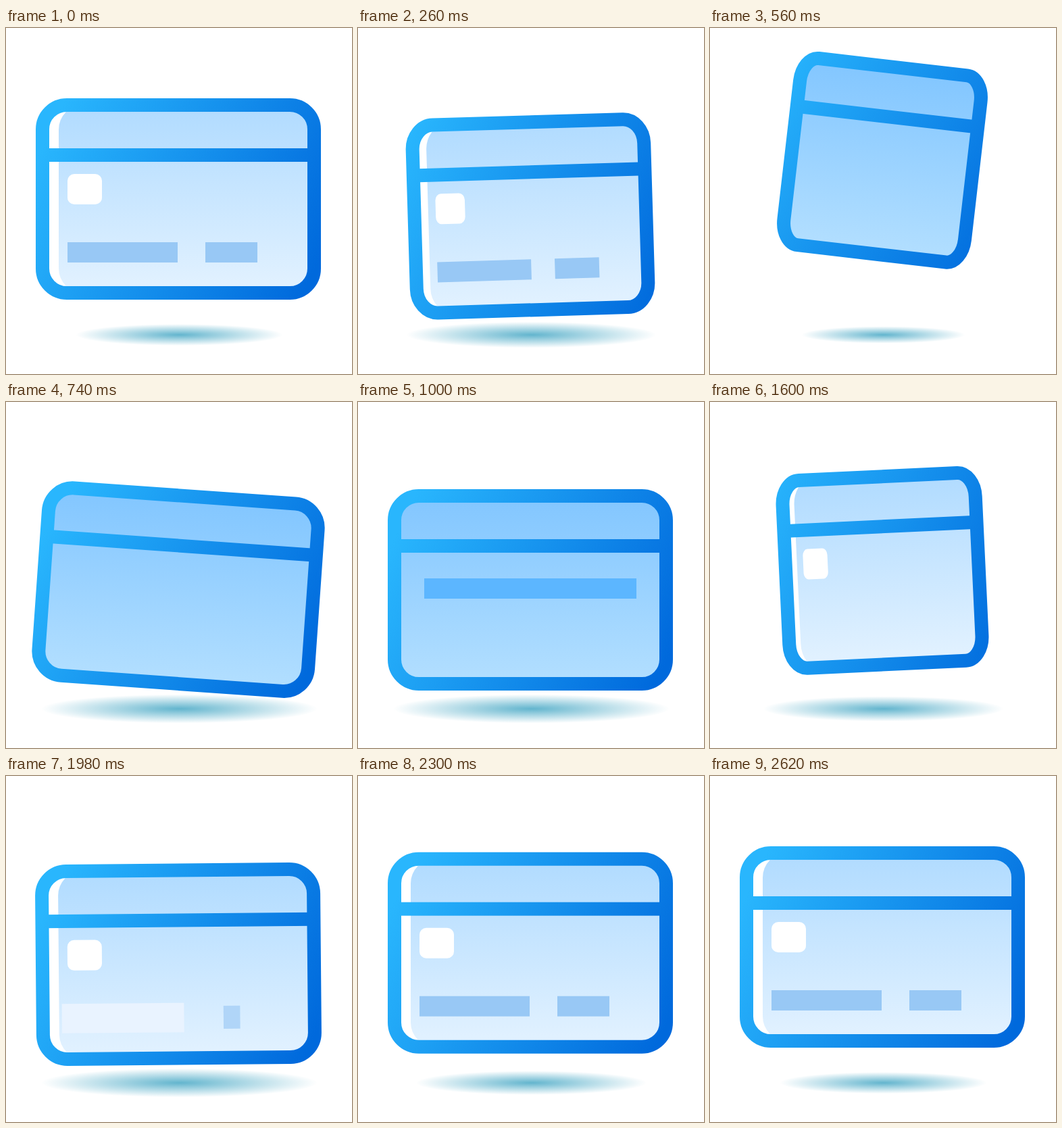
These frames come from a looping animation (512x512 px, 2.64 s). An HTML page:

```html
<!DOCTYPE html>
<html lang="en">
<head>
<meta charset="utf-8">
<title>Flipping card</title>
<style>
  @property --turn { syntax: "<angle>"; inherits: true; initial-value: 0deg; }

  html, body { margin: 0; width: 100%; height: 100%; overflow: hidden; background: #fff; }
  svg { display: block; width: 100vw; height: 100vh; }

  .card, .shadow, .front, .back, .bar {
    animation: 2640ms linear infinite;
  }
  .card {
    --s: max(.01, cos(var(--turn)), -1 * cos(var(--turn)));
    animation-name: turn, hop, tilt;
    animation-timing-function: cubic-bezier(.37, 0, .63, 1);
  }
  .shadow { animation-name: spread; animation-timing-function: cubic-bezier(.37, 0, .63, 1); }
  .front { animation-name: front; animation-timing-function: step-end; }
  .back { animation-name: back; animation-timing-function: step-end; }

  /* Only horizontal geometry narrows; strokes and gradients keep their size. */
  .box {
    x: calc(var(--x) * var(--s) * 1px);
    width: calc(var(--w) * var(--s) * 1px);
    rx: calc(var(--r, 0) * var(--s) * 1px);
    ry: calc(var(--r, 0) * 1px);
  }
  .frame { fill: none; stroke: url(#ink); stroke-width: 20px; }
  .chip { fill: #fff; }
  .bar {
    --ink: #98c8f5;
    fill: var(--ink);
    transform-box: fill-box;
    transform-origin: center;
    animation-name: pop;
  }
  .late { animation-delay: 58ms; }
  .back .bar { --ink: #5cb6ff; animation-delay: -1040ms; }

  @keyframes turn {
    0%, 1.55% { --turn: 0deg; }
    31.7%, 40.91% { --turn: 180deg; }
    70.53%, 100% { --turn: 360deg; }
  }
  @keyframes hop {
    0% { translate: 0 0; }
    9.09% { translate: 0 27px; }
    18.94% { translate: 0 -80px; animation-timing-function: ease-in; }
    20.45% { translate: 0 -73px; animation-timing-function: linear; }
    21.21% { translate: 0 -58px; animation-timing-function: ease-out; }
    28.41%, 40.15% { translate: 0 25px; }
    53.41% { translate: 0 -28px; }
    68.75%, 75.76% { translate: 0 25.5px; }
    94.7%, 100% { translate: 0 0; }
  }
  @keyframes tilt {
    0% { rotate: 0deg; }
    6.44% { rotate: -2.1deg; }
    9.85% { rotate: -1.7deg; }
    19.7% { rotate: 7deg; animation-timing-function: linear; }
    21.21% { rotate: 6.6deg; animation-timing-function: linear; }
    27.27% { rotate: 4.7deg; animation-timing-function: ease-out; }
    36.36%, 40.15% { rotate: 0deg; }
    56.06% { rotate: -3deg; animation-timing-function: linear; }
    60.61% { rotate: -2.7deg; animation-timing-function: linear; }
    68.18% { rotate: -2.1deg; animation-timing-function: ease-out; }
    75% { rotate: -.5deg; }
    81.82% { rotate: -.45deg; }
    87.12%, 100% { rotate: 0deg; }
  }
  @keyframes spread {
    0% { scale: 1; }
    7.2% { scale: 1.335; animation-timing-function: ease-in; }
    9.85% { scale: 1.21; animation-timing-function: ease-out; }
    18.94% { scale: .76; animation-timing-function: ease-in; }
    21.21% { scale: .79; }
    28.03%, 40.15% { scale: 1.335; }
    53.41% { scale: 1.02; animation-timing-function: ease-in; }
    60.61% { scale: 1.16; animation-timing-function: ease-out; }
    70.08%, 75.76% { scale: 1.335; }
    94.7%, 100% { scale: 1; }
  }
  @keyframes front {
    0% { visibility: visible; }
    16.63% { visibility: hidden; }
    55.72%, 100% { visibility: visible; }
  }
  @keyframes back {
    0% { visibility: hidden; }
    16.63% { visibility: visible; }
    55.72%, 100% { visibility: hidden; }
  }
  @keyframes pop {
    0%, 30% { scale: 1 1; }
    30.01%, 71.97% { scale: 0 1; fill: var(--ink); }
    75% { scale: 1.11 1.46; fill: #eaf4ff; }
    77.27%, 100% { scale: 1 1; fill: var(--ink); }
  }
</style>
</head>
<body>
<svg viewBox="0 0 512 512">
  <defs>
    <linearGradient id="ink" gradientUnits="userSpaceOnUse" x1="-200" y1="-80" x2="200" y2="110">
      <stop stop-color="#29b6fd"/>
      <stop offset="1" stop-color="#0069dc"/>
    </linearGradient>
    <linearGradient id="light" x2="0" y2="1">
      <stop stop-color="#b0dbff"/>
      <stop offset="1" stop-color="#e3f2ff"/>
    </linearGradient>
    <linearGradient id="deep" x2="0" y2="1">
      <stop stop-color="#82c6ff"/>
      <stop offset="1" stop-color="#b3dfff"/>
    </linearGradient>
    <radialGradient id="shade">
      <stop stop-color="#0a8bb2" stop-opacity=".64"/>
      <stop offset="1" stop-color="#0a8bb2" stop-opacity="0"/>
    </radialGradient>
  </defs>

  <g transform="translate(256.5 454)">
    <ellipse class="shadow" rx="153" ry="16" fill="url(#shade)"/>
  </g>

  <g transform="translate(255 253)">
    <g class="card">
      <g class="front">
        <rect class="box" style="--x:-177;--w:378;--r:36" y="-139" height="278" fill="url(#light)"/>
        <rect class="box chip" style="--x:-164;--w:51;--r:10" y="-37" height="45"/>
        <rect class="box bar" style="--x:-164;--w:163" y="64" height="30"/>
        <rect class="box bar late" style="--x:40;--w:77" y="64" height="30"/>
      </g>
      <g class="back">
        <rect class="box" style="--x:-201;--w:402;--r:36" y="-139" height="278" fill="url(#deep)"/>
        <rect class="box bar" style="--x:-157;--w:314" y="-17" height="30"/>
      </g>
      <rect class="box" style="--x:-201;--w:402" y="-75" height="20" fill="url(#ink)"/>
      <rect class="box frame" style="--x:-201;--w:402;--r:36" y="-139" height="278"/>
    </g>
  </g>
</svg>
</body>
</html>
```
